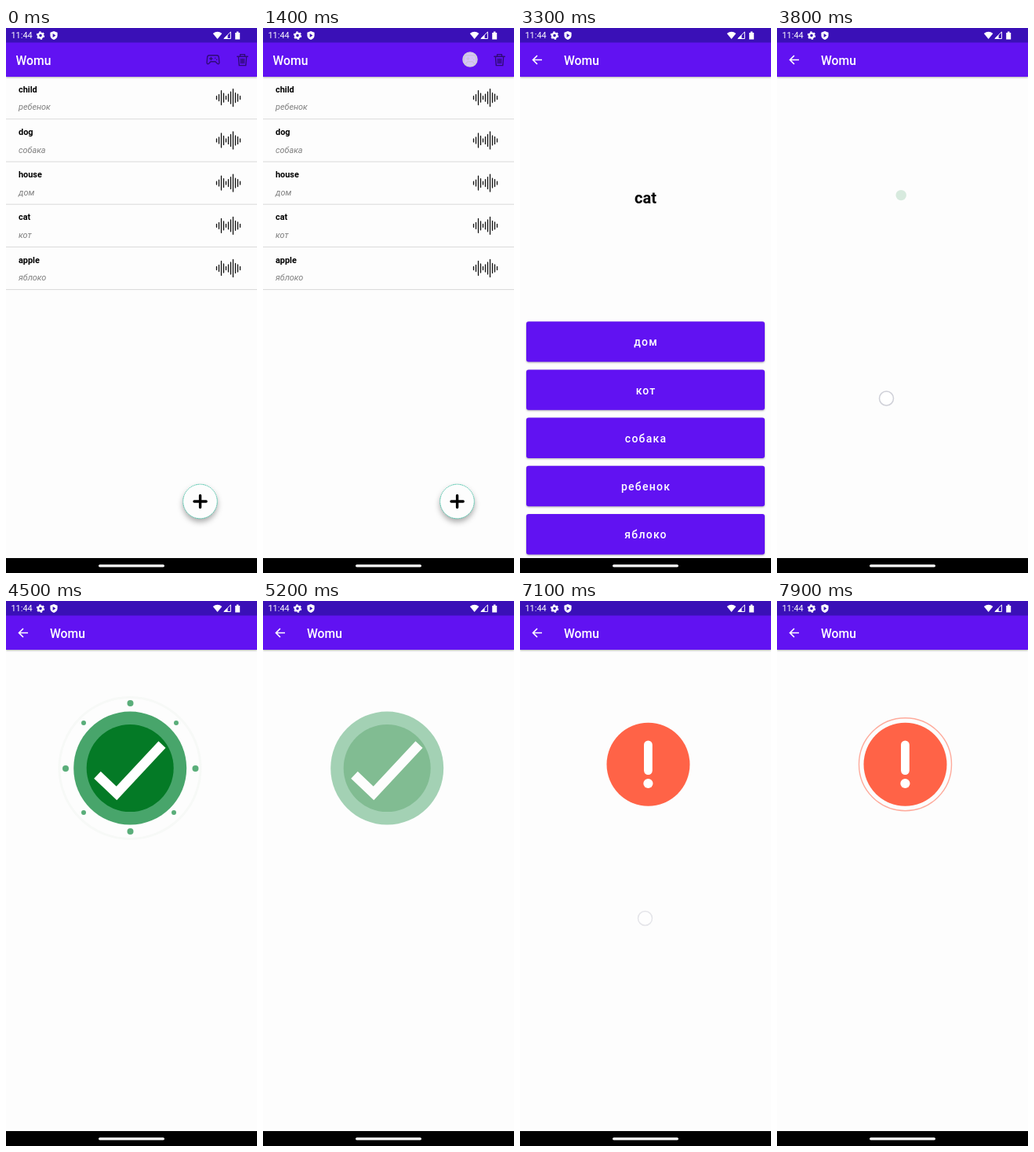
These frames come from a looping animation (320x693 px, 8000 ms). An HTML page:

```html
<!DOCTYPE html>
<html lang="ru">
<head>
<meta charset="utf-8">
<title>Womu</title>
<style>
html, body { margin: 0; width: 100%; height: 100%; overflow: hidden; background: #fdfdfd; }
svg { display: block; width: 100%; height: 100%; font-family: Roboto, "Noto Sans", sans-serif; }
.title { font-size: 15.7px; font-weight: 500; fill: #fff; }
.word { font-size: 10.9px; font-weight: 700; }
.hint { font-size: 10.9px; font-style: italic; fill: #808080; }
.item { font-size: 14px; font-weight: 700; }
.ask { font-size: 20px; font-weight: 700; text-anchor: middle; }
.label { font-size: 14px; font-weight: 500; letter-spacing: 1.25px; fill: #fff; text-anchor: middle; }
.line { stroke: #d9d9d9; }
.dark { fill: none; stroke: #300a78; stroke-width: 1.4; stroke-linecap: round; stroke-linejoin: round; }
.shade { filter: drop-shadow(0 1px 1.2px rgba(0, 0, 0, .3)); }
</style>
</head>
<body>
<svg id="stage" viewBox="0 0 320 693" preserveAspectRatio="none"></svg>
<script>
const LOOP = 8000;
const PURPLE = '#6112f2', GREEN = '#047a26', RED = '#ff6347';
const words = [['child', 'ребенок'], ['dog', 'собака'], ['house', 'дом'], ['cat', 'кот'], ['apple', 'яблоко']];
const answers = ['дом', 'кот', 'собака', 'ребенок', 'яблоко'];
const bars = [4, 8, 18, 11, 4, 9, 15, 22, 12, 9, 4];

const text = (x, y, cls, s, extra = '') => `<text x="${x}" y="${y}" class="${cls}" ${extra}>${s}</text>`;
const rect = (x, y, w, h, fill, extra = '') =>
  `<rect x="${x}" y="${y}" width="${w}" height="${h}" fill="${fill}" ${extra}/>`;
const circle = (x, y, r, fill, extra = '') => `<circle cx="${x}" cy="${y}" r="${r}" fill="${fill}" ${extra}/>`;
const path = (d, extra) => `<path d="${d}" ${extra}/>`;
const line = y => path(`M0 ${y}H320`, 'class="line"');

const screen = (id, bar, body) => `<g id="${id}">
  ${rect(0, 62, 320, 612, '#fdfdfd')}
  <g id="${id}Body">${body}</g>
  ${rect(0, 18, 320, 44, PURPLE, 'class="shade"')}${bar}</g>`;

const wave = (x, y) => path(
  bars.map((h, i) => `M${x + i * 3} ${y - h / 2}v${h}`).join(''),
  'stroke="#111" stroke-width="1.3" stroke-linecap="round"');

const listRow = ([word, hint], i) => {
  const y = i * 54.2;
  return text(16, 81.7 + y, 'word', word) + text(16, 104.3 + y, 'hint', hint) +
    wave(268.5, 88.7 + y) + line(115.8 + y);
};

const fab = circle(247.5, 602, 21.8, '#fdfdfd',
    'stroke="#45c4a8" stroke-dasharray="1.6 .7" style="filter:drop-shadow(0 4px 3.5px rgba(0,0,0,.32))"') +
  path('M240 602h15.2M247.6 594.4v15.2', 'stroke="#000" stroke-width="3.4" stroke-linecap="round"');

const toolIcons = path('M259 34.8h10q2.2 0 2.4 3l.5 6q0 2.6-2.3 1.6l-2.6-2.6h-6l-2.6 2.6q-2.3 1-2.3-1.6l.5-6q.2-3 2.4-3z' +
    'M259.8 39h3.2M261.4 37.4v3.2M266.6 38.2h.1M268.6 40.2h.1', 'class="dark"') +
  path('M294.8 36.2h13.4M298.6 36v-2.4h5.8V36M296.4 36.4l.9 11.2h8.4l.9-11.2M299.6 39.2v5.6M301.5 39.2v5.6M303.4 39.2v5.6', 'class="dark"');

const back = path('M28 40.5H17M22 35l-5.5 5.5L22 46', 'fill="none" stroke="#fff" stroke-width="1.6"');

const button = (s, i) => {
  const y = 373.2 + i * 61.2;
  return rect(8, y, 304, 51.4, PURPLE, 'rx="3" class="shade"') + text(160.6, y + 31.1, 'label', s);
};

const statusBar = rect(0, 0, 320, 18.5, '#3a10b7') +
  text(6.5, 13.4, '', '11:44', 'font-size="10.9" fill="#fff"') +
  circle(44, 9.6, 3, 'none', 'stroke="#fff" stroke-width="2.4"') +
  circle(44, 9.6, 4.5, 'none', 'stroke="#fff" stroke-width="1.5" stroke-dasharray="2.4 2.31"') +
  path('M61 4l4.6 1.8v3.6q0 3.8-4.6 5.6q-4.6-1.8-4.6-5.6V5.8z', 'fill="#fff"') +
  path('M59.6 7.1v4.8l3.8-2.4z', 'fill="#3a10b7"') +
  path('M263.8 7Q269.6 2.6 275.4 7L269.6 14z', 'fill="#fff"') +
  path('M286.4 5v8.5h-8.6z', 'fill="none" stroke="#fff"') +
  path('M282.6 8.7v4.8h-4.8z', 'fill="#fff"') +
  path('M292.2 6h1.7V4.6h2.6V6h1.7v8.4h-6z', 'fill="#fff"');

const dots = Array.from({ length: 8 }, (_, i) => circle(0, 0, i % 2 ? 3 : 4, '#5aae7a', 'class="dot"')).join('');

const success = `<g id="ok">
  ${circle(158, 212.5, 90, 'none', 'id="halo" stroke="#f7f9f7" stroke-width="3"')}
  ${circle(158.2, 212.6, 0, '#48a56b', 'id="outer"')}
  ${circle(158.2, 212.6, 0, GREEN, 'id="inner"')}
  <polyline id="tick" points="116.5,221.3 141,244.5 199,182.5" fill="none" stroke="#fff" stroke-width="12.4"
    pathLength="100" stroke-dasharray="100 200"/>
  ${dots}</g>`;

const failure = `<g id="bad">
  ${circle(163.5, 207.7, 53, 'none', `id="pulse" stroke="${RED}" stroke-width="1.4"`)}
  <g id="mark">${circle(163.5, 207.7, 53, RED)}
  ${rect(158, 177.4, 10.8, 43.6, '#fff', 'rx="5.4"')}${circle(163.4, 232, 6.1, '#fff')}</g></g>`;

const stage = document.getElementById('stage');
stage.innerHTML = rect(0, 0, 320, 693, '#fdfdfd') +
  screen('list', text(12.5, 46.6, 'title', 'Womu') + toolIcons, words.map(listRow).join('') + fab) +
  screen('menu', text(12.5, 46.6, 'title', 'Womu'),
    text(16, 98, 'item', 'Выбери перевод') + line(123.5) + text(16, 159.5, 'item', 'Найди пару') + line(184.7)) +
  screen('quiz', back + text(56, 46.6, 'title', 'Womu'),
    `<g id="question">${text(160, 223, 'ask', 'cat', 'id="ask"')}${answers.map(button).join('')}</g>${success}${failure}`) +
  statusBar +
  rect(0, 674, 320, 19, '#000') + rect(118, 682.2, 84, 3.2, '#fff', 'rx="1.6"') +
  circle(0, 0, 9, 'rgba(255,255,255,.75)', 'id="touch" stroke="#cfd0d8" stroke-width="1.5"');

const el = {};
stage.querySelectorAll('[id]').forEach(n => el[n.id] = n);
const dotEls = [...stage.querySelectorAll('.dot')];
// Resting offsets of the dots around the badge, clockwise from the top
const dotEnds = [[0, -83], [58.5, -58], [83, 0], [55.5, 56], [0, 80], [-59.5, 56], [-82.5, 0], [-59.5, -58]];
// Taps: x, y, start, start of fade, end
const taps = [[264, 40, 1400, 1550, 1700], [148.5, 97, 2100, 2250, 2400],
  [139.5, 471, 3680, 3850, 4050], [159.5, 403.5, 6700, 6980, 7240]];

const prog = (t, a, b) => Math.min(1, Math.max(0, (t - a) / (b - a)));
const ease = p => 1 - (1 - p) ** 3;
const set = (n, attrs) => { for (const k in attrs) n.setAttribute(k, attrs[k]); };
const show = (n, on) => { n.style.display = on ? '' : 'none'; };

function enter(id, t, a, b) {
  const p = ease(prog(t, a, b));
  show(el[id], p > 0);
  set(el[id], { opacity: p });
  set(el[id + 'Body'], { transform: `translate(0 ${24 * (1 - p)})` });
}

function drawSuccess(t) {
  show(el.ok, t >= 3780 && t < 5300);
  const fade = 1 - prog(t, 5100, 5300);
  const grow = prog(t, 3760, 4200);
  set(el.ok, { opacity: fade });
  set(el.outer, { r: 72 * grow, opacity: .1 + .9 * prog(t, 3740, 4250) });
  set(el.inner, { r: 55.5 * ease(prog(t, 3930, 4300)) });
  const drawn = prog(t, 4180, 4450);
  show(el.tick, drawn > 0);
  set(el.tick, { 'stroke-dashoffset': 100 * (1 - drawn) });
  set(el.halo, { opacity: prog(t, 4200, 4400) * (1 - prog(t, 4500, 4700)) });
  const out = .7 + .3 * ease(prog(t, 4150, 4480));
  const alpha = prog(t, 4150, 4300) * (1 - prog(t, 4550, 4850));
  dotEls.forEach((d, i) => set(d, {
    cx: 158.5 + dotEnds[i][0] * out, cy: 213 + dotEnds[i][1] * out, opacity: alpha
  }));
}

function drawFailure(t) {
  show(el.bad, t >= 6800);
  const s = ease(prog(t, 6800, 7080));
  set(el.mark, { transform: `translate(163.5 207.7) scale(${s}) translate(-163.5 -207.7)` });
  const p = t < 7170 ? 0 : (t - 7170) % 500 / 500;
  set(el.pulse, { r: 53 + 13 * p, opacity: t < 7170 ? 0 : 1 - p });
}

function drawTouch(t) {
  const tap = taps.find(k => t >= k[2] && t < k[4]);
  show(el.touch, tap);
  if (tap) set(el.touch, { cx: tap[0], cy: tap[1], opacity: 1 - prog(t, tap[3], tap[4]) });
}

function draw(t) {
  enter('menu', t, 1550, 1850);
  enter('quiz', t, 2280, 2560);
  show(el.question, t < 3780 || (t >= 5300 && t < 6800));
  el.ask.textContent = t < 4600 ? 'cat' : 'dog';
  drawSuccess(t);
  drawFailure(t);
  drawTouch(t);
}

const start = performance.now();
function tick() {
  draw((performance.now() - start) % LOOP);
  requestAnimationFrame(tick);
}
tick();
</script>
</body>
</html>
```
